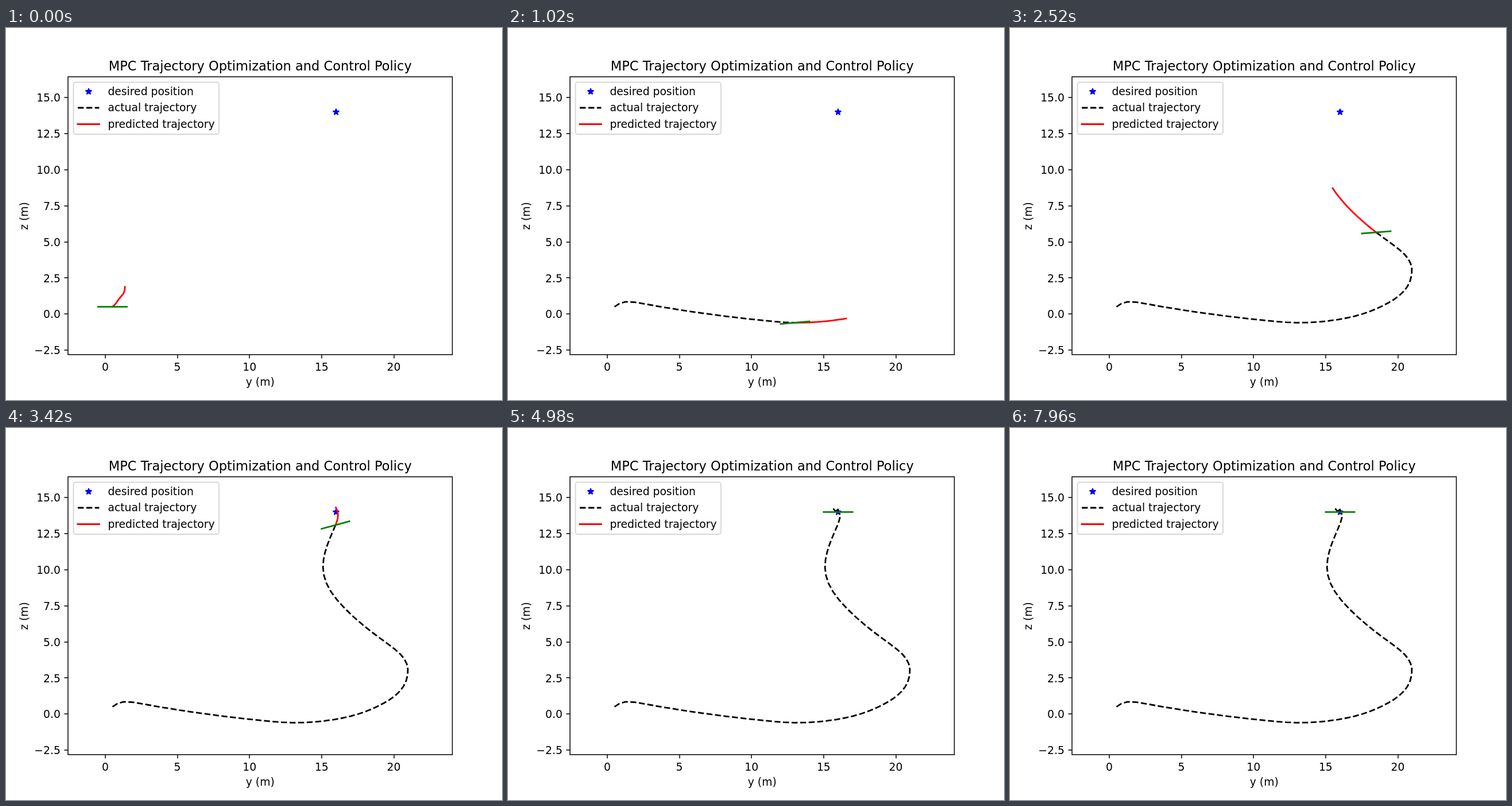
These frames come from a looping animation (864 px wide and 648 px high, 8 s). An HTML page:

```html
<!DOCTYPE html>
<html lang="en">
<head>
<meta charset="utf-8">
<title>Trajectory plot</title>
<style>
  html, body { margin: 0; width: 100%; height: 100%; overflow: hidden; background: #fff; }
  svg { display: block; width: 864px; height: 648px; }
  text { font: 18.75px "DejaVu Sans", Verdana, sans-serif; fill: #000; }
  .title { font-size: 22.5px; }
  .mid { text-anchor: middle; }
  .end { text-anchor: end; }
  .axis { fill: none; stroke: #000; stroke-width: 1.5; }
  .line { fill: none; stroke-width: 2.8125; stroke-linejoin: round; }
  .actual { stroke: #000; stroke-dasharray: 10.406 4.5; }
  .predicted { stroke: #f00; stroke-linecap: square; }
  .drone { stroke: #008000; stroke-linecap: square; }
  .star { fill: #00f; stroke: #00f; stroke-width: 1.875; stroke-linejoin: bevel; }
  .legend { fill: #fff; fill-opacity: .8; stroke: #ccc; stroke-opacity: .8; stroke-width: 1.875; }
</style>
</head>
<body>
<svg viewBox="0 0 864 648">
  <g id="ticks"></g>
  <path class="star" id="goal"/>
  <polyline class="line actual" id="actual"/>
  <polyline class="line predicted" id="predicted"/>
  <path class="line drone" id="drone"/>
  <rect class="axis" x="108" y="85" width="669.5" height="484"/>
  <text class="title mid" x="442.8" y="74">MPC Trajectory Optimization and Control Policy</text>
  <text class="mid" x="442.8" y="623">y (m)</text>
  <text class="mid" transform="translate(38 327.5) rotate(-90)">z (m)</text>
  <rect class="legend" x="117.5" y="94.5" width="253.5" height="90.5" rx="3.75"/>
  <path class="star" id="key"/>
  <path class="line actual" d="M125 139H162.4"/>
  <path class="line predicted" d="M125 167.5H162.4"/>
  <text x="177.4" y="117">desired position</text>
  <text x="177.4" y="145">actual trajectory</text>
  <text x="177.4" y="174">predicted trajectory</text>
</svg>
<script>
const LOOP = 8000, STEP = 60, LAST = 78, HORIZON = 5, UNIT = 25.13;
const $ = id => document.getElementById(id);
const range = (n, f) => Array.from({ length: n }, (_, i) => f(i));
const toX = v => 172.9 + v * UNIT;
const toY = v => 498.2 - v * UNIT;

// way points of the flight: step, x, y on the stage
const way = [
  [0, 185.5, 485.6], [2, 205, 476.9], [4, 238, 480.6], [8, 318, 493.8], [14, 442, 509.2],
  [17, 500, 513.3], [22, 587, 505], [27, 647, 485], [32, 692.4, 450], [35, 700, 420],
  [38, 687, 394], [42, 638, 356], [47, 566, 285], [50, 552.2, 243], [54, 563.7, 193.5],
  [57, 574, 169], [59.5, 578.3, 153.5], [62, 574.5, 143.5], [65, 567.8, 140.8],
  [70, 571.5, 145], [LAST, toX(16), toY(14)]
];
// step, tilt in degrees
const tilt = [
  [0, 0], [3, -30], [14, 2], [28, 17], [33, 17], [42, 4.4], [48, -12], [57, 15], [62, 14], [67, -7], [76, 0]
];
// step, offset between the predicted end and the later flight
const miss = [
  [0, -50, -33], [3, 0, 0], [10, 0, 8], [17, 2, 1], [32, -9.5, -2.5], [42, -4, -6], [50, 0, 0], [57, 0, -5], [66, 0, 0]
];

// index of the interval that holds t
const interval = (keys, t) => Math.max(0, Math.min(keys.length - 2, keys.findIndex(k => k[0] > t) - 1));

function linear(keys, t, col) {
  const end = keys[keys.length - 1];
  if (t >= end[0]) return end[col];
  const i = interval(keys, t), a = keys[i], b = keys[i + 1];
  return a[col] + (b[col] - a[col]) * (t - a[0]) / (b[0] - a[0]);
}

// natural cubic spline through one column of the keys
function spline(keys, col) {
  const n = keys.length - 1, bend = Array(n + 1).fill(0), c = [0], d = [0];
  const gap = i => keys[i + 1][0] - keys[i][0];
  const slope = i => (keys[i + 1][col] - keys[i][col]) / gap(i);
  for (let i = 1; i < n; i++) {
    const p = 2 * (gap(i - 1) + gap(i)) - gap(i - 1) * c[i - 1];
    c[i] = gap(i) / p;
    d[i] = (6 * (slope(i) - slope(i - 1)) - gap(i - 1) * d[i - 1]) / p;
  }
  for (let i = n - 1; i > 0; i--) bend[i] = d[i] - c[i] * bend[i + 1];
  return t => {
    if (t >= keys[n][0]) return keys[n][col];
    const i = interval(keys, t), h = gap(i), b = (t - keys[i][0]) / h, a = 1 - b;
    return a * keys[i][col] + b * keys[i + 1][col]
      + ((a ** 3 - a) * bend[i] + (b ** 3 - b) * bend[i + 1]) * h * h / 6;
  };
}

const flight = [spline(way, 1), spline(way, 2)];
const place = t => flight.map(f => f(t));
const toPoints = list => list.map(p => p.map(v => v.toFixed(2)).join()).join(" ");

function star(x, y) {
  const corners = range(10, i => {
    const r = i % 2 ? 2.149 : 5.625, a = i * Math.PI / 5;
    return [x + r * Math.sin(a), y - r * Math.cos(a)];
  });
  return "M" + toPoints(corners) + "Z";
}

function drawTicks() {
  let out = "";
  for (let v = 0; v <= 20; v += 5) {
    const x = toX(v);
    out += `<path class="axis" d="M${Math.round(x)} 569v6.56"/><text class="mid" x="${x}" y="597">${v}</text>`;
  }
  for (let v = -2.5; v <= 15; v += 2.5) {
    const y = toY(v), label = v.toFixed(1).replace("-", "\u2212");
    out += `<path class="axis" d="M108 ${Math.round(y)}h-6.56"/><text class="end" x="94.9" y="${Math.round(y + 7.15)}">${label}</text>`;
  }
  $("ticks").innerHTML = out;
}

function draw(n) {
  const [x, y] = place(n), a = linear(tilt, n, 1) * Math.PI / 180;
  const dx = UNIT * Math.cos(a), dy = UNIT * Math.sin(a);
  const ahead = range(HORIZON * 2 + 1, i => {
    const k = i / 2, w = (k / HORIZON) ** 2;
    return place(n + k).map((v, c) => v + w * linear(miss, n, c + 1));
  });
  $("actual").setAttribute("points", toPoints(range(n + 1, place)));
  $("predicted").setAttribute("points", toPoints(ahead));
  $("drone").setAttribute("d", "M" + toPoints([[x - dx, y + dy], [x + dx, y - dy]]));
}

drawTicks();
$("goal").setAttribute("d", star(toX(16), toY(14)));
$("key").setAttribute("d", star(144, 110.8));

const start = performance.now();
let shown = -1;
function tick() {
  const t = Math.max(0, performance.now() - start) % LOOP;
  const n = Math.min(LAST, Math.floor(t / STEP));
  if (n !== shown) draw(shown = n);
  requestAnimationFrame(tick);
}
tick();
</script>
</body>
</html>
```
